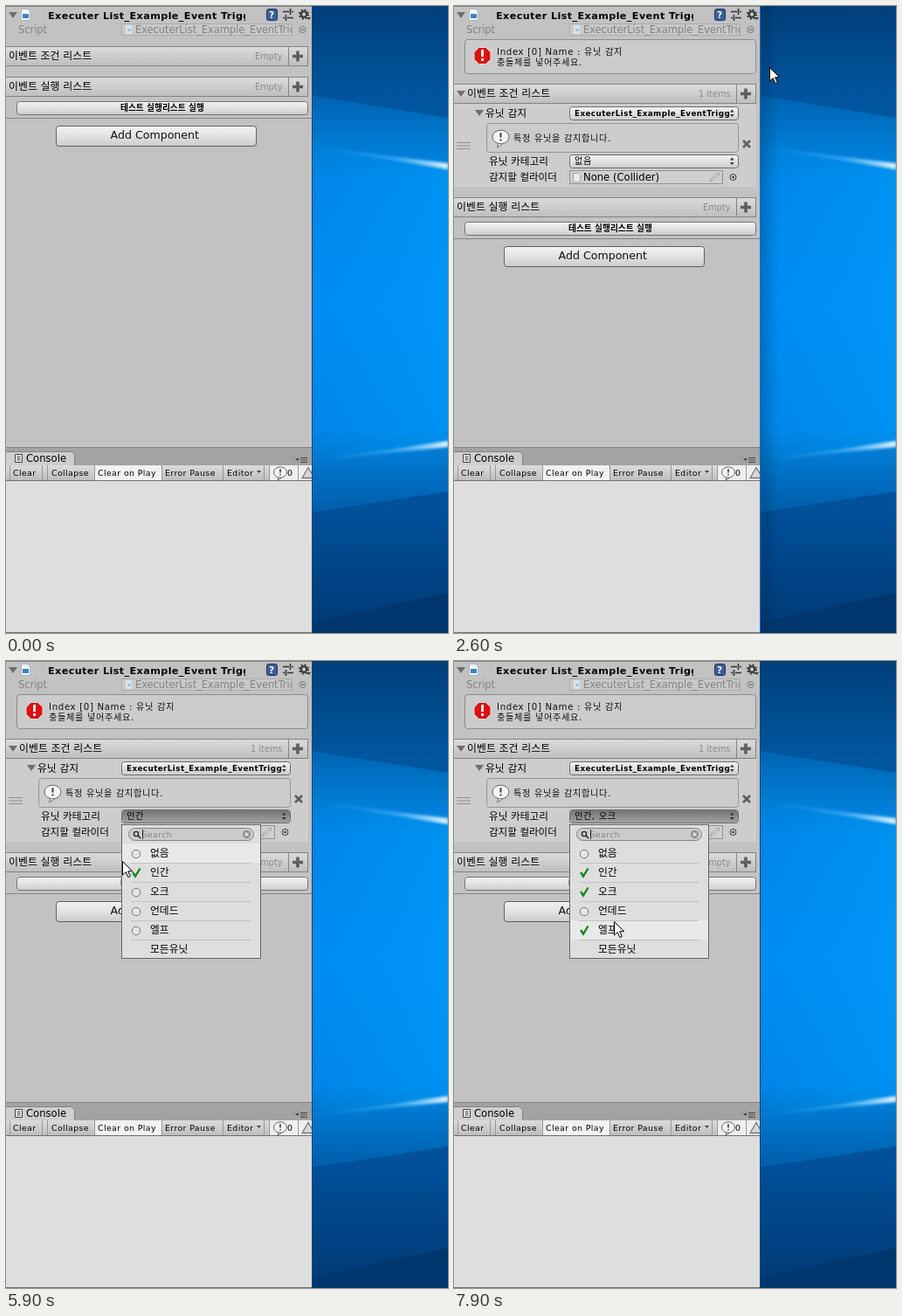
An HTML page for the animation above (8000 ms loop, 506 by 718 pixels).

```html
<!DOCTYPE html>
<html lang="ko">
<head>
<meta charset="utf-8">
<title>Inspector</title>
<style>
  html, body { margin: 0; width: 100%; height: 100%; overflow: hidden; background: #c2c2c2; }
  svg { display: block; }
  text { font-family: 'DejaVu Sans', 'Noto Sans CJK KR', 'Noto Sans CJK JP', sans-serif; }
  .b { font-weight: bold; }
  .spaced { letter-spacing: .65px; }
  .loose { letter-spacing: .4px; }
</style>
</head>
<body>
<svg id="stage" width="506" height="718" viewBox="0 0 506 718"></svg>
<script>
const LOOP = 8000, STEP = 100;

// Drawing helpers
const text = (x, y, s, size = 11.5, fill = '#000', cls = '') =>
  `<text x="${x}" y="${y}" font-size="${size}" fill="${fill}" class="${cls}">${s}</text>`;
const rect = (x, y, w, h, fill, extra = '') =>
  `<rect x="${x}" y="${y}" width="${w}" height="${h}" fill="${fill}" ${extra}/>`;
const box = (x, y, w, h, fill, stroke = '#848484', r = 0) =>
  rect(x + .5, y + .5, w - 1, h - 1, fill, `stroke="${stroke}" rx="${r}"`);
const path = (d, stroke, width = 1, fill = 'none') =>
  `<path d="${d}" stroke="${stroke}" stroke-width="${width}" fill="${fill}"/>`;
const shape = (d, fill) => path(d, 'none', 0, fill);
const group = (id, body) => `<g id="${id}">${body}</g>`;
const gradient = (id, stops, dir = 'x2="0" y2="1"') =>
  `<linearGradient id="${id}" ${dir}>` + stops.map(([at, color, alpha = 1]) =>
    `<stop offset="${at}" stop-color="${color}" stop-opacity="${alpha}"/>`).join('') + '</linearGradient>';

// Widgets
const foldout = (x, y) => shape(`M${x} ${y}h10l-5 7z`, '#6e6e6e');
const picker = (x, y, c) =>
  `<circle cx="${x}" cy="${y}" r="3.5" fill="none" stroke="${c}"/><circle cx="${x}" cy="${y}" r="1.3" fill="${c}"/>`;
const bubble = (x, y, r) =>
  path(`M${x - r * .3} ${y + r * .75}l-1 ${r * .5}l${r * .6} -${r * .4}`, '#666', 1, '#f5f5f5') +
  `<ellipse cx="${x}" cy="${y}" rx="${r}" ry="${r * .82}" fill="#f5f5f5" stroke="#666"/>` +
  path(`M${x} ${y - r * .5}v${r * .55}m0 ${r * .2}v${r * .22}`, '#444', r * .22);
const listHeader = (y, x, title, info, infoX) =>
  box(-1, y, 347, 23, 'url(#bar)') + path(`M323.5 ${y}v23`, '#848484') +
  text(x, y + 15, title, 11.9) + text(infoX, y + 15, info, 9.8, '#8a8a8a') +
  path(`M328 ${y + 11.5}h12m-6 -6v12`, '#5e5e5e', 3.6);
const dropdown = (y, label) =>
  box(132, y, 194, 16, 'url(#button)', '#6c6c6c', 3) + label +
  shape(`M316 ${y + 6.5}l2.3 -3l2.3 3zm0 2.4l2.3 3l2.3 -3z`, '#333');

const defs = '<defs>' +
  gradient('sky', [[0, '#003f7a'], [.15, '#00569f'], [.8, '#00509a'], [1, '#003a74']]) +
  gradient('light', [[0, '#0064b2'], [.12, '#007cd4'], [.2, '#0086e8'], [.5, '#008cf2'], [.8, '#0086e8'],
    [.88, '#0076cc'], [1, '#005eaa']]) +
  gradient('right', [[0, '#00a4ff', 0], [1, '#00a4ff', .4]], '') +
  gradient('beam', [[0, '#35a8f8', .2], [.6, '#5cc0ff', .5], [1, '#f0fbff', .95]], '') +
  gradient('edge', [[0, '#002038', .25], [1, '#002038', 0]], '') +
  gradient('bar', [[0, '#dcdcdc'], [1, '#bebebe']]) +
  gradient('button', [[0, '#f2f2f2'], [.5, '#e2e2e2'], [1, '#cbcbcb']]) +
  gradient('pressed', [[0, '#747474'], [1, '#a2a2a2']]) +
  '<filter id="soft" x="-10%" y="-200%" width="120%" height="500%"><feGaussianBlur stdDeviation="1.6"/></filter>' +
  '<clipPath id="panel"><path d="M0 0h350v718h-350z"/></clipPath>' +
  '<clipPath id="titleClip"><path d="M0 0h274v20h-274z"/></clipPath>' +
  '<clipPath id="fieldClip"><path d="M132 18h195v18h-195z"/></clipPath>' +
  '<clipPath id="nameClip"><path d="M132 113h183v18h-183z"/></clipPath></defs>';

const desktop = rect(350, 0, 156, 718, 'url(#sky)') +
  shape('M350 103L506 128V556L350 580z', 'url(#light)') +
  shape('M350 163L506 182V502L350 520z', 'url(#right)') +
  shape('M350 706L506 672V718H350z', '#00376e') +
  `<g filter="url(#soft)">${shape('M350 161L506 180v7z', 'url(#beam)') +
    shape('M350 521L506 498v7z', 'url(#beam)')}</g>`;

const titleBar =
  foldout(3, 7) + path('M17.5 3.5h7l3 3v10h-10z', '#a9b4bd', 1, '#f4f8fb') + rect(19, 9, 7, 5, '#3c85c6') +
  `<g clip-path="url(#titleClip)">${text(48, 15, 'Executer List_Example_Event Trigger', 11.2, '#000', 'b loose')}</g>` +
  box(298, 3, 13, 14, '#38609c', '#1d3763', 2) + text(301, 14, '?', 10.5, '#fff', 'b') +
  path('M317 6.5h7m3 0h2M317 13.5h2m3 0h7M325.5 3v7M320.5 10v7', '#333', 1.6) +
  '<circle cx="341" cy="9.5" r="3.2" fill="none" stroke="#333" stroke-width="2"/>' +
  '<circle cx="341" cy="9.5" r="5" fill="none" stroke="#333" stroke-width="2" stroke-dasharray="2 1.93"/>' +
  shape('M344 13h5l-2.5 3z', '#333') +
  text(14, 31, 'Script', 11.4, '#828282') + box(132, 20, 196, 14, '#c8c8c8', '#adadad') +
  rect(137, 22, 7, 10, '#dde3e8') + rect(139, 26, 4, 3, '#a3bfd5') +
  `<g clip-path="url(#fieldClip)">${text(148, 31, 'ExecuterList_Example_EventTrigger', 11.4, '#828282')}</g>` +
  picker(339.5, 27, '#777');

const item =
  box(12, 38, 334, 40, '#cbcbcb', '#8c8c8c', 3) +
  path('M28.5 47.5h8l5.5 5.5v8l-5.5 5.5h-8l-5.5-5.5v-8z', '#f3dada', 1, '#dc1010') +
  path('M32.5 50v8m0 2v3', '#fff', 2.8) +
  text(49, 56, 'Index [0] Name : 유닛 감지', 10.2, '#111', 'spaced') +
  text(49, 68, '충돌체를 넣어주세요.', 10.2, '#111', 'spaced') +
  rect(0, 112, 346, 95, '#cdcdcd') +
  listHeader(89, 15, '이벤트 조건 리스트', '1 items', 280) + foldout(3, 97) +
  foldout(24, 119) + text(36, 127, '유닛 감지', 11.8) +
  dropdown(115, `<g clip-path="url(#nameClip)">${text(138, 126, 'ExecuterList_Example_EventTrigger', 8.8, '#000', 'b loose')}</g>`) +
  box(37, 134, 289, 34, '#cccccc', '#949494', 3) + bubble(53.5, 150, 9.5) +
  text(68, 155, '특정 유닛을 감지합니다.', 10.2, '#111', 'spaced') +
  path('M3 156.5h16m-16 3.5h16m-16 3.5h16', '#8d8d8d', 1.2) +
  path('M331 154l8 8m0 -8l-8 8', '#5e5e5e', 2.6) +
  text(40, 182, '유닛 카테고리', 11.65) +
  dropdown(170, rect(133, 171, 192, 14, 'url(#pressed)', 'id="held" rx="2.5"') +
    '<text id="value" class="spaced" x="138" y="181" font-size="10.2"></text>') +
  text(40, 200, '감지할 컬라이더') + box(132, 188, 176, 16, '#cfcfcf', '#929292') +
  path('M136.5 191.5h6l2 2v8h-8z', '#a5a5a5', 1, '#ececec') + text(148, 200, 'None (Collider)', 11.6) +
  path('M293 201l2-4l8-6l1 2l-8 6z', '#999', 1, '#ddd') + picker(319.5, 196, '#333');

const footer =
  listHeader(81, 3, '이벤트 실행 리스트', 'Empty', 285) +
  box(12, 109, 334, 16, 'url(#button)', '#747474', 3) + text(131, 120, '테스트 실행리스트 실행', 9.7, '#000', 'b') +
  path('M0 128.5h350', '#858585') +
  box(57, 137, 230, 24, 'url(#button)', '#5e5e5e', 3) + text(119.5, 152, 'Add Component', 12.6, '#111');

const tools = [[8, 'Clear'], [52, 'Collapse'], [105, 'Clear on Play'], [182, 'Error Pause'], [253, 'Editor'], [322, '0']];
const consoleView =
  rect(0, 505, 350, 21, '#a3a3a3') + path('M0 505.5h350', '#858585') +
  path('M-1 526v-15.5h76l3.5 3v12.5', '#828282', 1, '#cfcfcf') +
  path('M10.5 513.5h8v9h-8zm2 2.5h4m-4 2h4m-4 2h4', '#444', 1, '#eee') + text(23, 522, 'Console', 11.6) +
  shape('M331 518h5l-2.5 3z', '#444') + path('M337 517.5h8m-8 2.5h8m-8 2.5h8', '#444') +
  rect(0, 526, 350, 17, 'url(#bar)') + rect(102, 526, 76, 17, '#f3f3f3') + rect(302, 526, 48, 17, '#efefef') +
  path([4, 41, 47, 101, 178, 248, 295, 301, 334].map(x => `M${x}.5 526v17`).join(''), '#979797') +
  tools.map(([x, s]) => text(x, 538, s, 9.4, '#000', 'loose')).join('') + shape('M287 532h5l-2.5 3z', '#444') +
  bubble(314, 534, 7.5) + path('M339 540.5l7-12l7 12z', '#777', 1.3, '#d8d8d8') +
  rect(0, 543, 350, 1, '#707070') + rect(0, 544, 350, 173, '#dedede') + rect(0, 717, 350, 1, '#707070');

const units = ['없음', '인간', '오크', '언데드', '엘프', '모든유닛'];
const rowY = i => 209 + 22 * i;
const popup =
  box(132, 187, 160, 154, '#dedede', '#666') + rect(133, 0, 158, 22, '#e9e9e9', 'id="hover"') +
  box(140, 191, 144, 15, '#cbcbcb', '#858585', 7) +
  '<circle cx="149" cy="198" r="2.6" fill="none" stroke="#222" stroke-width="1.3"/>' +
  path('M151 200l3 3', '#222', 1.6) + text(155.5, 202, 'Search', 9.4, '#858585', 'loose') + path('M156.5 193v11', '#222') +
  '<circle cx="275.5" cy="198.5" r="4.5" fill="#8b8b8b"/>' + path('M273.5 196.5l4 4m0-4l-4 4', '#eee', 1.3) +
  units.map((name, i) => {
    const y = rowY(i);
    const marks = `<circle id="off${i}" cx="149" cy="${y + 12}" r="4.7" fill="#e6e6e6" stroke="#777"/>` +
      `<path id="on${i}" d="M145 ${y + 11}l3 4.5l5.5-9" fill="none" stroke="#0b8a14" stroke-width="2.3"/>`;
    return text(165, y + 15, name, 11.8) + (i < 5 ? marks + path(`M143 ${y + 22.5}h137`, '#c2c2c2') : '');
  }).join('');

const menu =
  rect(323, 47, 22, 21, '#000', 'opacity=".18"') + box(333, 55, 175, 46, '#e9e9e9', '#8e8e8e') +
  rect(334, 55, 172, 23, '#3f80e6') + text(355, 71, '유닛 감지', 11.8, '#fff') +
  text(355, 94, '오브젝트가 사라질 때', 12);

document.getElementById('stage').innerHTML = defs + desktop +
  group('active', rect(351, 0, 21, 718, 'url(#edge)')) +
  '<g clip-path="url(#panel)">' + rect(0, 0, 350, 718, '#c2c2c2') + path('M0 .5h350', '#8a8a8a') + titleBar +
  group('empty', listHeader(46, 3, '이벤트 조건 리스트', 'Empty', 285)) + group('item', item) +
  group('footer', footer) + consoleView + '</g>' +
  rect(350, 0, 1, 718, '#1d4468', 'id="rim"') + group('popup', popup) + group('menu', menu) +
  group('cursor', path('M.5 .5v15.5l3.7-3.4l2.6 6l2.5-1.1l-2.6-5.8h5z', '#000', 1, '#fff'));

// Pointer keys: time, x, y
const keys = [
  [100, 432, 253], [200, 300, 150], [300, 219, 75], [400, 219, 75], [800, 268, 82], [1300, 326, 67],
  [1400, 328, 51], [2000, 328, 51], [2300, 361, 70], [2700, 361, 70], [3300, 287, 114], [3600, 198, 156],
  [3900, 155, 175], [4300, 155, 175], [4900, 168, 235], [5800, 168, 235], [6200, 29, 212], [6300, 29, 212],
  [6600, 140, 182], [6800, 140, 182], [7300, 172, 257], [7600, 172, 257], [7900, 183, 298], [LOOP, 183, 298]
];

function pointer(t) {
  const i = keys.findIndex(k => k[0] > t);
  const [t0, x0, y0] = keys[i - 1] || keys[0], [t1, x1, y1] = keys[i];
  const p = t1 > t0 ? (t - t0) / (t1 - t0) : 0;
  return [x0 + (x1 - x0) * p, y0 + (y1 - y0) * p].map(Math.round);
}

const el = id => document.getElementById(id);
const show = (id, on) => { el(id).style.display = on ? '' : 'none'; };
const within = (t, from, to) => t >= from && t < to;

function draw(now) {
  const t = Math.floor(now % LOOP / STEP) * STEP;
  const [x, y] = pointer(t);
  const added = t >= 2600;
  const open = within(t, 4100, 6300) || t >= 6800;
  const active = within(t, 800, 1500) || added && !open;

  show('cursor', t >= 100);
  el('cursor').setAttribute('transform', `translate(${x} ${y})`);
  show('active', active);
  el('rim').setAttribute('fill', active ? '#0b6fc4' : '#1d4468');
  show('menu', within(t, 1500, 2600));
  show('empty', !added);
  show('item', added);
  el('footer').setAttribute('transform', `translate(0 ${added ? 138 : 0})`);

  show('popup', open);
  show('held', open);
  const row = Math.floor((y - rowY(0)) / 22);
  show('hover', x >= 132 && row >= 0 && row < 6);
  el('hover').setAttribute('y', rowY(row));
  el('value').textContent = t >= 7500 ? '인간, 오크' : t >= 5100 ? '인간' : '없음';
  [t < 5100, t >= 5100, t >= 7500, false, t >= 7900].forEach((on, i) => {
    show('on' + i, on);
    show('off' + i, !on);
  });
}

const start = performance.now();
(function frame() {
  draw(performance.now() - start);
  requestAnimationFrame(frame);
})();
</script>
</body>
</html>
```
